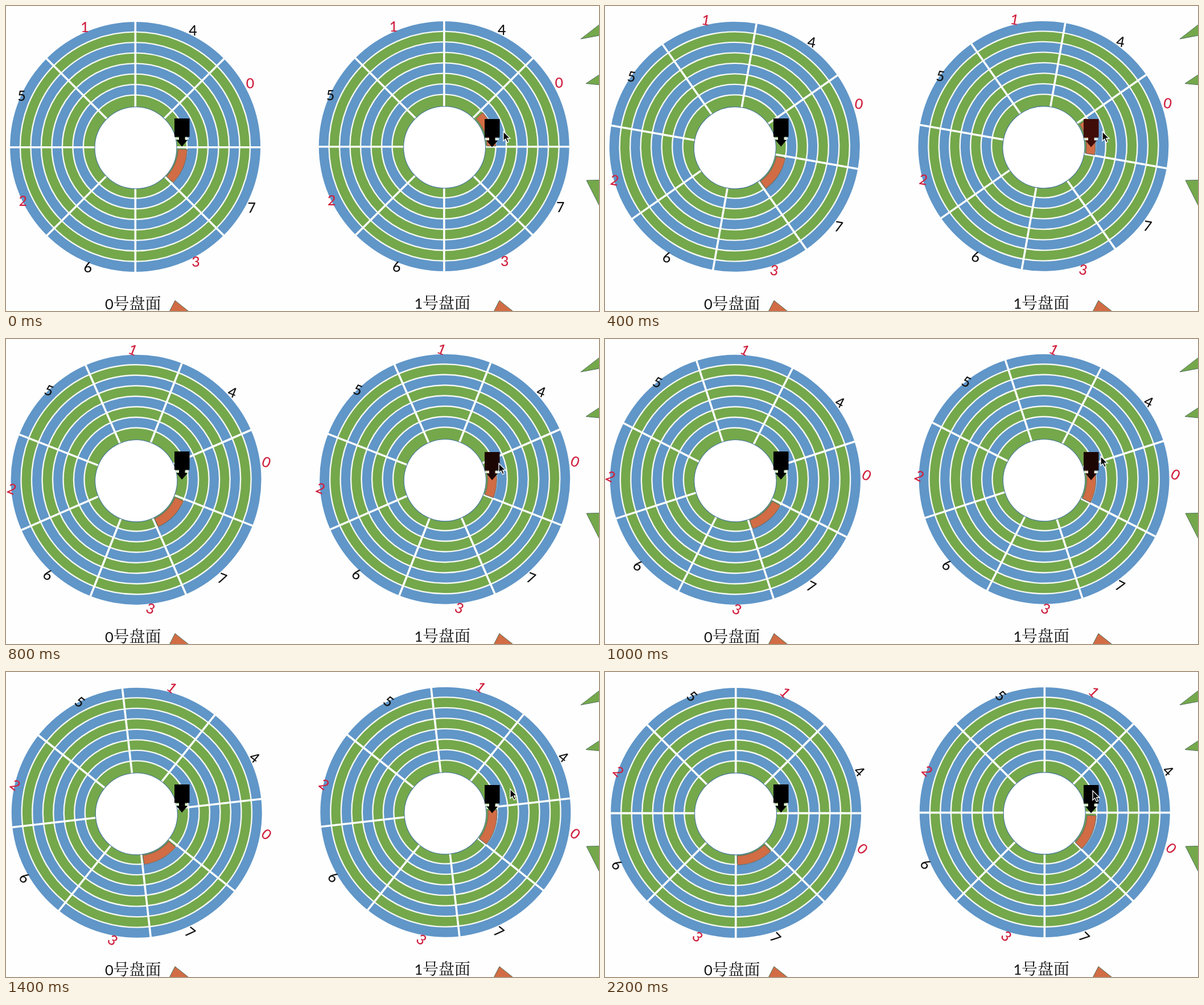
These frames come from a looping animation (1042x537 px, 2.4 s). An HTML page with a canvas:

```html
<!DOCTYPE html>
<html lang="zh">
<head>
<meta charset="utf-8">
<style>
html, body { margin: 0; width: 100%; height: 100%; overflow: hidden; background: #fefefe; }
canvas { display: block; }
</style>
</head>
<body>
<canvas id="stage" width="1042" height="537"></canvas>
<script>
const ctx = document.getElementById('stage').getContext('2d');
const BLUE = '#6096c8', GREEN = '#74a84b', ORANGE = '#d16c45', RED = '#d0213f', EDGE = '#50705a';
const STEP = 200, STEPS = 12, RAD = Math.PI / 180;
const PIVOT = [228.7, 251.7];
const DIGITS = 'Carlito, Calibri, Lato, sans-serif';

// pointer stops: step, x, y
const stops = [[2, 874, 221], [4, 866, 219], [6, 876, 194], [7, 886, 206], [9, 882, 234], [11, 857, 209]];

function paint(fill, stroke, width = 1) {
  if (fill) { ctx.fillStyle = fill; ctx.fill(); }
  if (stroke) { ctx.strokeStyle = stroke; ctx.lineWidth = width; ctx.stroke(); }
}

function circle(x, y, r, fill, stroke, width) {
  ctx.beginPath();
  ctx.arc(x, y, r, 0, 2 * Math.PI);
  paint(fill, stroke, width);
}

function poly(points, fill, stroke, width) {
  ctx.beginPath();
  points.forEach(([x, y]) => ctx.lineTo(x, y));
  ctx.closePath();
  paint(fill, stroke, width);
}

function label(text, deg, r) {
  ctx.fillStyle = text < '4' ? RED : '#111';
  ctx.fillText(text, 227 + r * Math.cos(deg * RAD), 256.7 + r * Math.sin(deg * RAD));
}

function disc(x, y, angle, from) {
  ctx.save();
  ctx.translate(x + PIVOT[0], y + PIVOT[1]);
  ctx.rotate(angle * RAD);
  ctx.translate(-PIVOT[0], -PIVOT[1]);

  circle(227.1, 248, 220, BLUE);
  for (let k = 0; k < 7; k++)
    circle(227, 247.7, 202.1 - 18.5 * k, k % 2 ? BLUE : GREEN, '#f4f8f2', 2.4);

  ctx.beginPath();
  for (let k = 0; k < 4; k++) {
    const dx = 221 * Math.cos(k * 45 * RAD), dy = 221 * Math.sin(k * 45 * RAD);
    ctx.moveTo(227.3 - dx, 248.8 - dy);
    ctx.lineTo(227.3 + dx, 248.8 + dy);
  }
  paint(null, '#fdfefd', 3.6);

  circle(228, 249.8, 72, '#fff', '#46759c', 1.1);

  ctx.beginPath();
  ctx.arc(228, 249, 90.5, from * RAD, (from + 41) * RAD);
  ctx.arc(228, 249, 74.5, (from + 41) * RAD, from * RAD, true);
  ctx.closePath();
  paint(ORANGE, '#5c6864');

  // labels sit in pairs mirrored about a slightly tilted axis
  ctx.font = `500 25px ${DIGITS}`;
  ctx.textAlign = 'center';
  [[28.3, 231], [62.9, 228.5], [112.1, 228.5], [155, 219]].forEach(([deg, r], k) => {
    label('0415'[k], -deg - 0.7, r);
    label('7362'[k], deg - 0.7, r);
  });
  ctx.restore();
}

function head(x, y, glow) {
  ctx.save();
  ctx.translate(x, y);
  ctx.fillStyle = '#e2ebdf';
  ctx.fillRect(1, 33.5, 24, 3.5);
  ctx.fillStyle = `rgb(${glow}, ${glow / 5}, ${glow / 8})`;
  ctx.fillRect(0, 0, 26.5, 32.5);
  poly([[8, 32], [18.5, 32], [18.5, 38], [23, 38], [13.2, 49.5], [3.5, 38], [8, 38]], ctx.fillStyle);
  ctx.restore();
}

function caption(digit, x, y) {
  ctx.fillStyle = '#111';
  ctx.textAlign = 'left';
  ctx.font = `25.5px ${DIGITS}`;
  ctx.fillText(digit, x, y);
  ctx.font = '28px "Noto Serif CJK SC", "Noto Sans CJK SC", "Noto Sans CJK", serif';
  ctx.fillText('号盘面', x + 14.5, y);
}

function cursor(step) {
  const n = stops.findIndex(stop => stop[0] >= step);
  const [t1, x1, y1] = stops[n], [t0, x0, y0] = stops[Math.max(0, n - 1)];
  const part = n ? (step - t0) / (t1 - t0) : 0;
  ctx.save();
  ctx.translate(x0 + (x1 - x0) * part, y0 + (y1 - y0) * part);
  poly([[0, 0], [0, 16.5], [3.8, 13], [6.6, 19.3], [9.4, 18], [6.8, 12], [12, 12]], '#0a0a0a', '#fff', 1.3);
  ctx.restore();
}

function scenery() {
  poly([[1010, 58], [1050, 27], [1050, 50.5]], GREEN, EDGE);
  poly([[1019, 136.5], [1050, 116], [1050, 139.5]], GREEN, EDGE);
  poly([[1020, 307], [1060, 306], [1060, 386]], GREEN, EDGE);
  for (const x of [297, 867])
    poly([[x, 518.5], [x - 15, 548], [x + 37, 548]], ORANGE, EDGE);
}

function draw(time) {
  const step = Math.floor(time / STEP) % STEPS;
  const angle = Math.max(0, Math.min(45, 5.7 * step - 1.4));
  // the right head reddens while its sector passes underneath
  const passing = angle > 0 && angle < 36;
  const glow = passing ? 28 + 18 * Math.max(0, 2 - Math.abs(step - 2)) : 0;

  ctx.fillStyle = '#fefefe';
  ctx.fillRect(0, 0, 1042, 537);
  scenery();
  disc(0, 0, angle, 2.3);
  disc(542.6, -1, angle, -42);
  head(296, 198, 0);
  head(841, 199, glow);
  caption('0', 174, 534);
  caption('1', 717.5, 533);
  cursor(step);
}

const start = performance.now();
function tick() {
  draw(performance.now() - start);
  requestAnimationFrame(tick);
}
tick();
</script>
</body>
</html>
```
